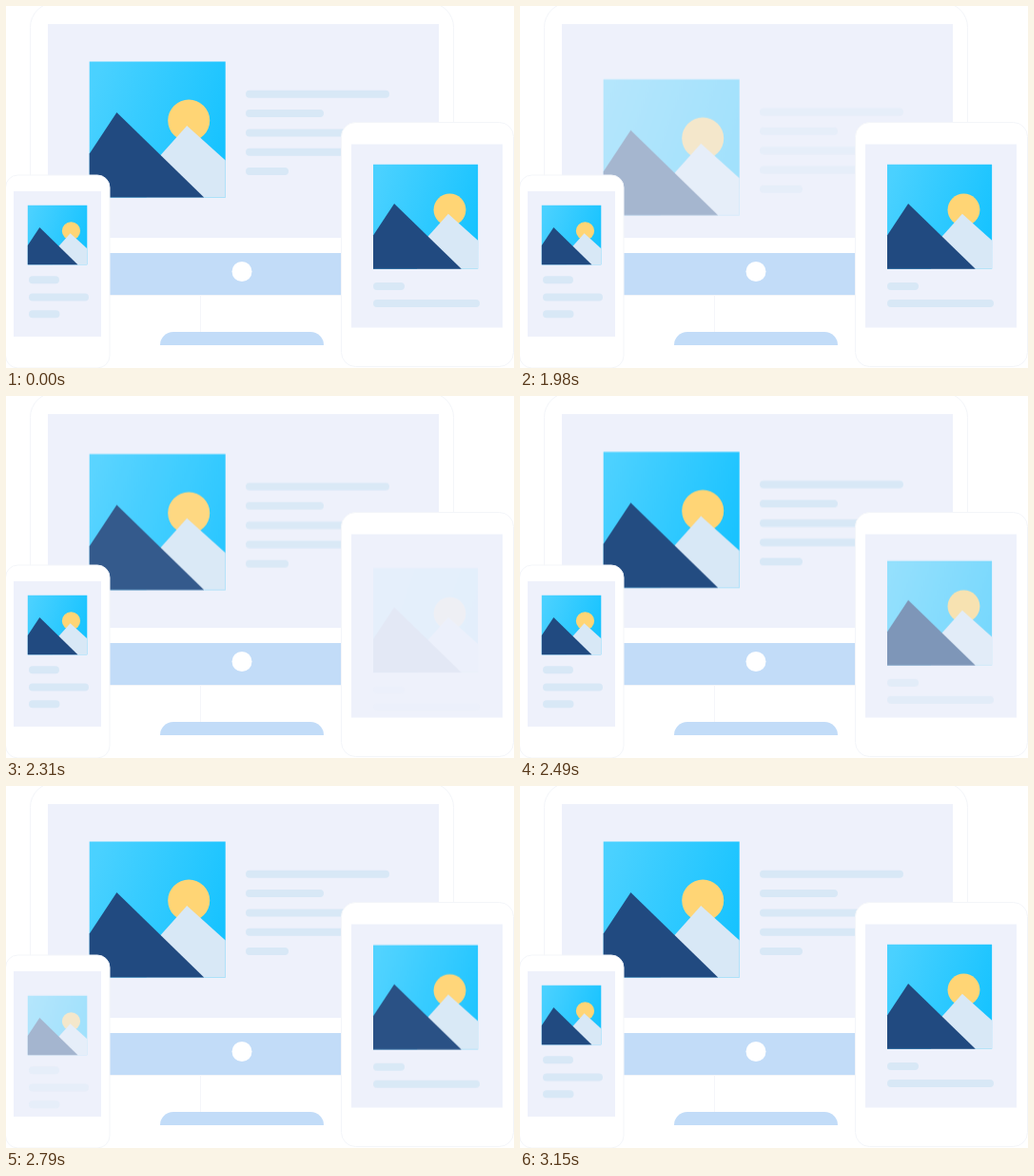
Write an HTML page that moves like this. It is 534 px wide and 381 px high and loops after 3.6 s.

```html
<!DOCTYPE html>
<html lang="en">
<head>
<meta charset="utf-8">
<title>Responsive screens</title>
<style>
  html, body { margin: 0; width: 100%; height: 100%; overflow: hidden; background: #fff; }
  svg { display: block; width: 534px; height: 381px; }
  .case { fill: #fff; stroke: #f3f5f9; }
  .screen { fill: #eef1fb; }
  .blue { fill: #c2dcf8; }
  .bars { stroke: #d8e8f6; stroke-width: 8; stroke-linecap: round; }
</style>
</head>
<body>
<svg viewBox="0 0 534 381">
  <defs>
    <linearGradient id="sky" x1="0" y1="0.25" x2="1" y2="0.6">
      <stop offset="0" stop-color="#4ad1ff"/>
      <stop offset="1" stop-color="#17c3ff"/>
    </linearGradient>
    <g id="photo">
      <path fill="url(#sky)" d="M0 0H143V143H0Z"/>
      <circle cx="104.5" cy="62" r="22" fill="#ffd575"/>
      <path fill="#d8e8f6" d="M102.5 67.5L143 104V143H60V115Z"/>
      <path fill="#214a80" d="M28.7 53.5L120.5 143H0V97Z"/>
    </g>
  </defs>

  <g>
    <rect class="case" x="25.5" y="-3.5" width="445" height="308" rx="26"/>
    <path class="screen" d="M44 19H455V244H44Z"/>
    <path class="blue" d="M60 260H440V304H60Z"/>
    <circle cx="248" cy="279.5" r="10.5" fill="#fff"/>
    <path d="M204.5 304V343" stroke="#f5f6fa"/>
    <path class="blue" d="M162 357A14 14 0 0 1 176 343H320A14 14 0 0 1 334 357Z"/>
    <g id="desktop">
      <use href="#photo" transform="translate(87.7 58.5)"/>
      <path class="bars" d="M256 92.8H399M256 113H330M256 133.4H380M256 153.8H380M256 174H293"/>
    </g>
  </g>

  <g>
    <rect class="case" x="352.5" y="122.5" width="181" height="257" rx="15"/>
    <path class="screen" d="M363 145.5H522V338.5H363Z"/>
    <g id="tablet">
      <use href="#photo" transform="translate(386 166.7) scale(.77)"/>
      <path class="bars" d="M390 295H415M390 313H494"/>
    </g>
  </g>

  <g>
    <rect class="case" x="-.5" y="178" width="109.5" height="203" rx="13"/>
    <path class="screen" d="M8 195H100V348H8Z"/>
    <g id="phone">
      <use href="#photo" transform="translate(22.8 209.7) scale(.437)"/>
      <path class="bars" d="M28 288.3H52M28 306.4H83M28 324.3H52.5"/>
    </g>
  </g>
</svg>
<script>
  const LOOP = 3600;

  // id, start (ms), length (ms), rise (px)
  const reveals = [
    ['desktop', 1800, 800, 29],
    ['tablet', 2265, 710, 15],
    ['phone', 2675, 510, 17]
  ];

  const pose = (time, opacity, y) => ({
    offset: time / LOOP, opacity, transform: `translateY(${y}px)`
  });

  for (const [id, start, length, rise] of reveals) {
    document.getElementById(id).animate([
      pose(0, 1, 0),
      pose(start, 1, 0),
      { ...pose(start, 0, rise), easing: 'ease' },
      pose(start + length, 1, 0),
      pose(LOOP, 1, 0)
    ], { duration: LOOP, iterations: Infinity });
  }
</script>
</body>
</html>
```
